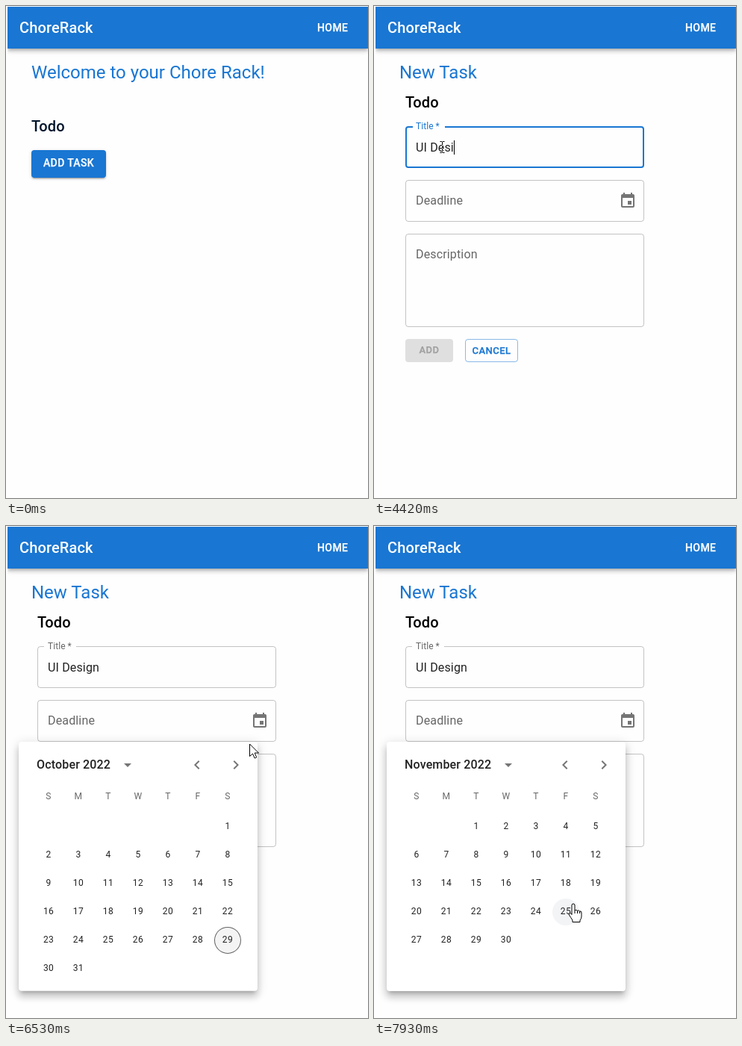
These frames come from a looping animation (485 by 659 pixels, 8 s). An HTML page:

```html
<!DOCTYPE html>
<html lang="en">
<head>
<meta charset="utf-8">
<title>Chore Rack</title>
<style>
html, body { margin: 0; width: 100%; height: 100%; overflow: hidden; background: #fefefe; }
body { position: relative; font: 400 16px/23px Roboto, Arial, sans-serif; color: rgba(0,0,0,.87);
  --shadow2: 0 3px 1px -2px rgba(0,0,0,.2), 0 2px 2px rgba(0,0,0,.14), 0 1px 5px rgba(0,0,0,.12);
  --shadow4: 0 2px 4px -1px rgba(0,0,0,.2), 0 4px 5px rgba(0,0,0,.14), 0 1px 10px rgba(0,0,0,.12);
  --shadow8: 0 5px 5px -3px rgba(0,0,0,.2), 0 8px 10px 1px rgba(0,0,0,.14), 0 3px 14px 2px rgba(0,0,0,.12); }
div, svg { position: absolute; box-sizing: border-box; }
div { white-space: pre; }
.full { inset: 0; }
#home, #form { background: #fefefe; }
.h5 { font-size: 24px; line-height: 32px; color: #1976d2; }
.h6 { font-size: 20px; line-height: 32px; font-weight: 500; letter-spacing: .15px; }
.btn { border-radius: 4px; text-align: center; font-weight: 500; font-size: 14px; letter-spacing: .4px; -webkit-text-stroke: .25px; }
.small { height: 31px; font-size: 13px; line-height: 29px; letter-spacing: .46px; }
#bar { left: 2px; top: 1px; right: 0; height: 56px; background: #1976d2; color: #fff;
  clip-path: inset(0 0 -20px 0); box-shadow: var(--shadow4); }
#open { left: 34px; top: 193px; width: 100px; height: 37px; line-height: 35px; color: #fff; }
.field { left: 42px; width: 320px; border-radius: 4px; border: 1px solid rgba(0,0,0,.23); }
.label { left: 56px; color: rgba(0,0,0,.6); letter-spacing: .15px; transform-origin: 0 0; }
#notch { top: 160px; height: 4px; background: #fefefe; }
#value { left: 56px; top: 177.5px; height: 23px; letter-spacing: .15px; }
#caret { left: 100%; top: 2.5px; width: 1px; height: 19px; background: #000; }
.disc { border-radius: 50%; }
.icon { width: 24px; height: 24px; fill: rgba(0,0,0,.54); }
#popup { left: 17px; top: 289px; width: 320px; height: 334px; border-radius: 4px; background: #fff;
  transform-origin: 50% 0; box-shadow: var(--shadow8); }
.month { left: 24px; top: 19px; line-height: 24px; font-weight: 500; letter-spacing: .15px; }
.month svg { left: 100%; top: 0; margin-left: 11px; }
#grid { left: 0; top: 96px; width: 320px; height: 230px; overflow: hidden; }
.day { width: 36px; height: 36px; border-radius: 50%; text-align: center; font-size: 12px; line-height: 35px; letter-spacing: .4px; }
.week { color: rgba(0,0,0,.6); line-height: 36px; }
.today { border: 1px solid rgba(0,0,0,.6); background: rgba(0,0,0,.045); line-height: 33px; }
#cursor { left: 0; top: 0; width: 100%; height: 100%; overflow: hidden; }
</style>
</head>
<body>
<div id="home" class="full">
  <div class="h5" style="left:34px;top:73px">Welcome to your Chore Rack!</div>
  <div class="h6" style="left:34px;top:145px;color:#00142b">Todo</div>
  <div id="open" class="btn">ADD TASK<div id="ripple" class="disc" style="background:rgba(255,255,255,.18)"></div></div>
</div>
<div id="form" class="full">
  <div class="h5" style="left:34px;top:73px">New Task</div>
  <div class="h6" style="left:42px;top:113px;color:#000">Todo</div>
  <div id="title" class="field" style="top:161px;height:56px"></div>
  <div id="notch"></div>
  <div id="titleLabel" class="label" style="top:161px">Title&thinsp;*</div>
  <div id="value"><span id="typed"></span><div id="caret"></div></div>
  <div id="deadline" class="field" style="top:233px;height:56px"></div>
  <div class="label" style="top:249px">Deadline</div>
  <div id="iconHover" class="disc" style="left:320px;top:241px;width:40px;height:40px;background:rgba(0,0,0,.04)"></div>
  <svg class="icon" style="left:328px;top:249px" viewBox="0 0 24 24"><path d="M17 12h-5v5h5v-5zM16 1v2H8V1H6v2H5c-1.11 0-1.99.9-1.99 2L3 19c0 1.1.89 2 2 2h14c1.1 0 2-.9 2-2V5c0-1.1-.9-2-2-2h-1V1h-2zm3 18H5V8h14v11z"/></svg>
  <div class="field" style="top:305px;height:125px"></div>
  <div class="label" style="top:321px">Description</div>
  <div class="btn small" style="left:42px;top:446px;width:64px;background:rgba(0,0,0,.12);color:rgba(0,0,0,.26);line-height:30px">ADD</div>
  <div class="btn small" style="left:122px;top:446px;width:71px;border:1px solid rgba(25,118,210,.5);color:#1976d2">CANCEL</div>
</div>
<div id="bar">
  <div class="h6" style="left:16px;top:12px">ChoreRack</div>
  <div class="btn" style="left:415px;top:15.75px;line-height:24.5px">HOME</div>
</div>
<div id="popup">
  <div id="nextHover" class="disc" style="left:274px;top:14px;width:34px;height:34px"></div>
  <svg class="icon" style="left:227px;top:19px" viewBox="0 0 24 24"><path d="M15.41 16.59 10.83 12l4.58-4.59L14 6l-6 6 6 6z"/></svg>
  <svg class="icon" style="left:279px;top:19px" viewBox="0 0 24 24"><path d="M8.59 16.59 13.17 12 8.59 7.41 10 6l6 6-6 6z"/></svg>
  <div id="grid"></div>
</div>
<div id="press" class="disc" style="width:24px;height:24px;background:rgb(255,238,0)"></div>
<svg id="cursor"><path id="shape" stroke-linejoin="round"/></svg>
<script>
const $ = id => document.getElementById(id);
const clamp = v => Math.max(0, Math.min(1, v));
const easeOut = v => 1 - (1 - clamp(v)) ** 3;
const mix = (a, b, k) => a + (b - a) * k;
const show = (el, on) => { el.style.display = on ? '' : 'none'; };

const LOOP = 8000;
const PRESS = 1390, SUBMIT = 1640, FOCUS = 2140, BLUR = 6110, POPUP = 6320, SLIDE = 7160;

// Bursts of movement: start, end, number of steps
const BURSTS = [
  [200, 970, 12], [1390, 2140, 12], [2210, 2420, 4],
  [5450, 6250, 13], [6320, 7090, 12], [7160, 7930, 12]
];
const KEYS = [3020, 3230, 3500, 3770, 3960, 4290, 4420, 4760, 4890];
const WORD = 'UI Design';

// Clicks: time, x, y
const CLICKS = [[PRESS, 81, 217], [FOCUS, 91, 195], [BLUR, 339, 263], [7020, 309, 322]];

// Pointer path: time, x, y, shape
const PATH = [
  [200, 361, 536, 'arrow'], [340, 304, 412, 'arrow'], [480, 236, 298, 'arrow'],
  [690, 135, 234, 'arrow'], [760, 110, 224, 'hand'], [970, 81, 217, 'hand'],
  [1460, 81, 217, 'hand'], [1590, 85, 217, 'beam'], [2140, 91, 195, 'beam'],
  [2420, 91, 189, 'beam'], [5450, 91, 189, 'beam'], [5580, 172, 219, 'arrow'],
  [5645, 230, 240, 'beam'], [5780, 345, 286, 'arrow'], [5850, 372, 295, 'arrow'],
  [5980, 350, 272, 'hand'], [6110, 340, 264, 'hand'], [6320, 340, 264, 'hand'],
  [6530, 326, 292, 'arrow'], [6670, 313, 316, 'hand'], [6810, 310, 338, 'arrow'],
  [6880, 309.5, 341.5, 'arrow'], [6950, 309, 330, 'hand'], [7020, 309, 322, 'hand'],
  [7230, 309, 322, 'hand'], [7370, 304, 360, 'arrow'], [7510, 292, 430, 'hand'],
  [7720, 272, 492, 'hand'], [7860, 267, 507, 'hand']
];
const SHAPES = {
  arrow: 'M0 0V16.5L4 13l2.7 6 2.5-1.1L6.7 12H12Z',
  beam: 'M-3-7.5h2.2l.8.6.8-.6H3M-3 7.5h2.2l.8-.6.8.6H3M0-7V7',
  hand: 'M-2 1Q-2-1 0-1 2-1 2 1V8Q4 6.5 5.5 8.3 7.5 7.2 8.6 9 11 8.3 11 11V16Q11 19 9 21V23.5H-1V21Q-3 18-5.5 14-6.5 11.5-4.5 11.5-3 11.5-2 13.5ZM2 8V12M5.5 8.3V12M8.6 9V12'
};

function add(parent, cls, text, x, y) {
  const el = document.createElement('div');
  el.className = cls;
  el.textContent = text;
  if (x !== undefined) Object.assign(el.style, { left: x + 'px', top: y + 'px' });
  return parent.appendChild(el);
}

function makeMonth(name, first, count) {
  const head = add($('popup'), 'month', name);
  head.insertAdjacentHTML('beforeend', '<svg class="icon" viewBox="0 0 24 24"><path d="M7 10l5 5 5-5z"/></svg>');
  const sheet = add($('grid'), 'full', '');
  const days = [];
  for (let d = 0; d < count; d++) {
    const n = d + first;
    days.push(add(sheet, 'day', d + 1, 22 + n % 7 * 40, Math.floor(n / 7) * 38));
  }
  return { head, sheet, days, first };
}

[...'SMTWTFS'].forEach((c, i) => add($('popup'), 'day week', c, 22 + 40 * i, 55));
const october = makeMonth('October 2022', 6, 31);
const november = makeMonth('November 2022', 2, 30);
october.days[28].classList.add('today');

function snap(t) {
  let s = 0;
  for (const [from, to, n] of BURSTS) {
    if (t < from) break;
    const step = (to - from) / (n - 1);
    s = Math.min(to, from + Math.floor((t - from + 6) / step) * step);
  }
  return s;
}

function pointer(t) {
  const i = PATH.findLastIndex(p => t >= p[0] - 8);
  if (i < 0) return null;
  const a = PATH[i], b = PATH[i + 1] || a;
  const k = b === a ? 0 : clamp((t - a[0]) / (b[0] - a[0]));
  return { x: mix(a[1], b[1], k), y: mix(a[2], b[2], k), kind: a[3] };
}

function outline(el, hot, focus) {
  el.style.border = focus ? '2px solid #1976d2' : `1px solid rgba(0,0,0,${hot ? .87 : .23})`;
}

function drawHome(t, over) {
  const hot = over(34, 193, 134, 230);
  const level = t >= PRESS ? 8 : hot ? 4 : 2;
  $('open').style.background = hot ? '#1565c0' : '#1976d2';
  $('open').style.boxShadow = `var(--shadow${level})`;
  const r = 13 * Math.max(0, t - PRESS) / 205;
  Object.assign($('ripple').style, {
    left: 47 - r + 'px', top: 24 - r + 'px', width: 2 * r + 'px', height: 2 * r + 'px'
  });
}

function drawForm(t, raw, over, p) {
  const focus = t >= FOCUS && t < BLUR;
  const rise = easeOut((t - FOCUS) / 200);
  const blue = t < BLUR ? rise : 1 - clamp((t - BLUR) / 200);
  const closed = t < POPUP;
  outline($('title'), closed && over(42, 161, 362, 217), focus);
  outline($('deadline'), closed && over(42, 233, 362, 289));
  $('notch').style.left = (focus ? 52 : 51) + 'px';
  $('notch').style.width = 43 * clamp((t - FOCUS) / 100) + 'px';
  $('titleLabel').style.transform = `translateY(${mix(16, -9, rise)}px) scale(${mix(1, .75, rise)})`;
  $('titleLabel').style.color =
    `rgba(${mix(0, 25, blue)},${mix(0, 118, blue)},${mix(0, 210, blue)},${mix(.6, 1, blue)})`;
  $('typed').textContent = WORD.slice(0, KEYS.filter(k => raw >= k).length);
  show($('caret'), raw >= 2210 && raw < 2680 || raw >= KEYS[0] && raw < 5450);
  show($('iconHover'), closed && p && Math.hypot(p.x - 340, p.y - 261) < 20);
}

function drawPopup(t, p) {
  const grow = easeOut((t - POPUP + 60) / 300);
  $('popup').style.opacity = grow;
  $('popup').style.transform = grow < 1 ? `scale(${mix(.75, 1, grow)},${mix(.5625, 1, grow)})` : '';
  const near = clamp((27 - Math.hypot(p.x - 308, p.y - 320)) / 8);
  $('nextHover').style.background = `rgba(0,0,0,${.04 * near})`;

  const slide = easeOut((t - SLIDE + 40) / 350);
  october.sheet.style.transform = `translateX(${-100 * slide}%)`;
  november.sheet.style.transform = `translateX(${100 - 100 * slide}%)`;
  october.head.style.opacity = 1 - slide;
  november.head.style.opacity = slide;

  const col = Math.floor((p.x - 37) / 40), row = Math.floor((p.y - 385) / 38);
  const hot = slide === 1 && row >= 0 ? row * 7 + col - november.first : -1;
  november.days.forEach((d, i) => { d.style.background = i === hot ? 'rgba(25,50,80,.05)' : ''; });
}

function drawPointer(t, p) {
  show($('cursor'), p);
  const click = CLICKS.findLast(c => t >= c[0]);
  const glow = click ? .65 * clamp((220 - (t - click[0])) / 110) : 0;
  $('press').style.opacity = t > 1580 && t < FOCUS ? 0 : glow;
  if (click) $('press').style.transform = `translate(${click[1] - 12}px,${click[2] - 12}px)`;
  if (!p) return;
  const shape = $('shape');
  const beam = p.kind === 'beam';
  const half = p.kind === 'hand' ? 0 : .5;
  // The text beam inverts what lies below it
  $('cursor').style.mixBlendMode = beam ? 'difference' : 'normal';
  shape.setAttribute('d', SHAPES[p.kind]);
  shape.setAttribute('fill', beam ? 'none' : '#fff');
  shape.setAttribute('stroke', beam ? '#fff' : '#000');
  shape.setAttribute('transform', `translate(${Math.round(p.x - half) + half} ${Math.round(p.y)})`);
}

function render(raw) {
  const t = snap(raw), p = pointer(t);
  const over = (x0, y0, x1, y1) => p && p.x >= x0 && p.x <= x1 && p.y >= y0 && p.y <= y1;
  const form = t >= SUBMIT;
  show($('home'), !form);
  show($('form'), form);
  show($('popup'), t >= POPUP);
  if (form) drawForm(t, raw, over, p); else drawHome(t, over);
  if (t >= POPUP) drawPopup(t, p);
  drawPointer(t, p);
}

const start = performance.now();
function frame() {
  render((performance.now() - start) % LOOP);
  requestAnimationFrame(frame);
}
render(0);
requestAnimationFrame(frame);
</script>
</body>
</html>
```
